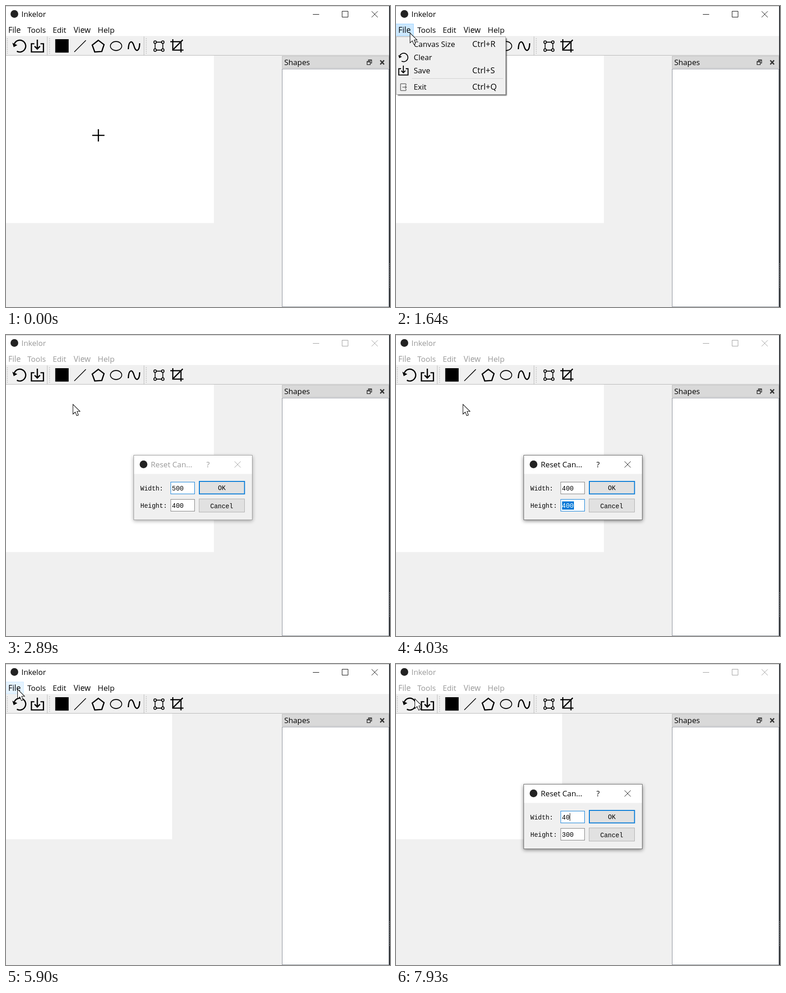
Write an HTML page that moves like this. It is 846 px wide and 662 px high and loops after 8000 ms.

```html
<!DOCTYPE html>
<html lang="en">
<head>
<meta charset="utf-8">
<title>Inkelor</title>
<style>
html, body { margin: 0; width: 100%; height: 100%; overflow: hidden; background: #f0f0f0; }
svg { display: block; width: 846px; height: 662px; font: 16.8px "Open Sans", "Noto Sans", sans-serif; }
text { white-space: pre; }
.mono { font: 14px "Liberation Mono", monospace; }
.line { fill: none; stroke: #000; }
.thick { stroke-width: 2.7; }
#bar, #caption { fill: #000; stroke: #000; }
#bar text, #caption text { stroke: none; }
#bar.off, #caption.off { fill: #999; stroke: #999; }
</style>
</head>
<body>
<svg viewBox="0 0 846 662">
  <defs>
    <filter id="blur" x="-10%" y="-10%" width="120%" height="130%"><feGaussianBlur stdDeviation="4"/></filter>
    <filter id="soft"><feGaussianBlur stdDeviation="1"/></filter>
    <g id="undo" class="line thick">
      <path d="M18.500 83A13 13 0 1 1 24 99.500"/>
      <path d="M14 81 25 86 17 90.500Z" fill="#000" stroke="none"/>
    </g>
    <path id="save" class="line thick" d="M62.500 83H56V101H82.500V83H76M69 74V93M63 88.500 69 94.500 75 88.500"/>
  </defs>

  <rect width="846" height="662" fill="#f0f0f0"/>
  <rect width="844" height="66" fill="#fff"/>
  <rect id="fileBg" x="-.5" y="39.500" width="39" height="26"/>
  <path class="line" d="M0 .5H844" style="stroke:#bdbdbd"/>
  <circle cx="18.500" cy="17.500" r="8.500" fill="#222"/>
  <g id="bar">
    <text x="34" y="24">Inkelor</text>
    <text x="5" y="59" font-size="17.400">File</text>
    <text x="47" y="59">Tools</text>
    <text x="103" y="59">Edit</text>
    <text x="149" y="59" font-size="17.300">View</text>
    <text x="202" y="59" font-size="17.200">Help</text>
    <path fill="none" d="M676 18.500H690M740.500 11.500H753.500V24.500H740.500ZM805.500 11.500 819 25M819 11.500 805.500 25"/>
  </g>

  <path class="line" style="stroke:#b4b4b4" d="M0 108.500H844M91 67V108M304 67V108"/>
  <path class="line" style="stroke:#aaa" stroke-width="1.500" stroke-dasharray="1.500 2.500" d="M3 71V106M96 71V106M309 71V106"/>
  <use href="#undo"/>
  <use href="#save"/>
  <rect x="108.500" y="73" width="29.500" height="29.500"/>
  <g class="line thick">
    <path stroke-width="1.700" d="M150.500 101 176 75.500"/>
    <path d="M203.500 75.500 216 85 211 100 195.500 101 190 86Z"/>
    <ellipse cx="242.500" cy="88" rx="12.500" ry="10" stroke-width="1.800"/>
    <path d="M269.500 95C270 76 278.500 74 282 88S294 101 294.500 82"/>
    <g stroke-width="1.800">
      <path d="M332 79.500H342M332 97H342M328.500 83V94M345.500 83V94"/>
      <circle cx="328.500" cy="79.500" r="2.800"/><circle cx="345.500" cy="79.500" r="2.800"/>
      <circle cx="328.500" cy="97" r="2.800"/><circle cx="345.500" cy="97" r="2.800"/>
    </g>
    <path stroke-width="2.500" d="M362 78.500H385.500V102M367.500 73V97H391M389.500 74.500 368 96"/>
  </g>

  <rect id="canvas" y="109" fill="#fff"/>

  <rect x="608.500" y="110.500" width="235" height="25.500" fill="#d9d9d9" stroke="#bcbcbc"/>
  <text x="613" y="130">Shapes</text>
  <path class="line" stroke-width="1.500" style="stroke:#333" d="M798.500 121V118.500H805.500V125.500H803M795.500 122H802.500V129H795.500ZM795.500 123H802.500M798.500 119.500H805.500"/>
  <path class="line" stroke-width="2.600" style="stroke:#333" d="M824.500 119.500 833 128.500M833 119.500 824.500 128.500"/>
  <rect x="608.500" y="138.500" width="235" height="523" fill="#fff" stroke="#828790"/>
  <rect x="844" width="2" height="662" fill="#25282c"/>
  <path class="line" style="stroke:#999" stroke-dasharray="2 2" d="M845.500 566V620"/>

  <g id="menu">
    <path d="M4 71H244V197H4Z" opacity=".6" filter="url(#soft)"/>
    <rect x=".5" y="67.500" width="241" height="127" fill="#f0f0f0" stroke="#a6a6a6"/>
    <rect id="pick" x="1" y="69" width="236" height="29" fill="#91c9f7"/>
    <text x="39" y="90">Canvas Size</text><text x="168" y="90" font-size="18">Ctrl+R</text>
    <text x="39" y="119">Clear</text>
    <text x="39" y="148">Save</text><text x="168" y="148" font-size="18">Ctrl+S</text>
    <text x="39" y="184">Exit</text><text x="168" y="184" font-size="18">Ctrl+Q</text>
    <use href="#undo" transform="translate(-5 49.600) scale(.72)"/>
    <use href="#save" transform="translate(-37 74) scale(.77)"/>
    <path class="line" style="stroke:#d0d0d0" d="M35 159.500H236"/>
    <path class="line" style="stroke:#666" stroke-width="1.500" d="M22 175V172Q22 171 21 171H11Q10 171 10 172V185Q10 186 11 186H21Q22 186 22 185V182M14 178.500H23M20 175.500 23 178.500 20 181.500"/>
  </g>

  <g id="dialog">
    <rect id="shade" x="281" y="267" width="262" height="142" filter="url(#blur)"/>
    <rect x="281" y="264" width="262" height="143" fill="#f0f0f0"/>
    <rect x="281" y="264" width="262" height="41.500" fill="#fff"/>
    <rect id="frame" x="281.500" y="264.500" width="261" height="142" fill="none"/>
    <circle cx="303" cy="284.500" r="8.500" fill="#222"/>
    <g id="caption">
      <text x="319" y="290.500">Reset Can...</text>
      <text x="441.500" y="290.500">?</text>
      <path fill="none" d="M503.500 278 517 291.500M517 278 503.500 291.500"/>
    </g>
    <g class="mono">
      <text x="296" y="342">Width:</text>
      <text x="296" y="380">Height:</text>
      <rect id="wBox" x="363" y="323.500" width="52.500" height="26" fill="#fff"/>
      <rect id="hBox" x="363" y="361.500" width="52.500" height="26" fill="#fff"/>
      <rect id="sel" x="366" y="366" width="26" height="18" fill="#0078d7"/>
      <text id="wText" x="365.500" y="342" font-size="14.400"></text>
      <text id="hText" x="365.500" y="380" font-size="14.400"></text>
      <rect id="caret" width="1" height="17"/>
      <rect x="426" y="322" width="99.500" height="27.500" fill="#e1e1e1" stroke="#0078d7" stroke-width="2"/>
      <rect x="425.500" y="360.500" width="100" height="29" fill="#e1e1e1" stroke="#adadad"/>
      <text id="ok" x="467" y="341">OK</text>
      <text x="450" y="380.500">Cancel</text>
    </g>
  </g>

  <path id="arrow" d="M.5.500V22L5.500 17.500 9 25.500 12.500 24 9.500 16H16Z" fill="#fff" stroke="#000" stroke-width="1.100"/>
  <path id="cross" class="line" stroke-width="2.600" d="M-13.500 0H13.500M0-13.500V13.500"/>
</svg>
<script>
const LOOP = 8000;
const $ = id => document.getElementById(id);
const set = (id, attrs) => {
  for (const k in attrs) $(id).setAttribute(k, attrs[k]);
};
const show = (id, on) => set(id, { visibility: on ? 'visible' : 'hidden' });

// Each row: time, value held from then on.
const menuFade = [[0, 0], [1260, .4], [1340, .8], [1410, 1], [1950, 0],
  [6200, .4], [6280, .8], [6350, 1], [7260, 0]];
const dialogFade = [[0, 0], [2030, .25], [2100, .62], [2180, .85], [2270, .95], [2350, 1],
  [4700, .5], [4790, .18], [4880, 0], [7340, .15], [7410, .45], [7480, .8], [7560, 1]];
const modal = [[0, false], [2030, true], [4700, false], [7340, true]];
const dialogActive = [[0, false], [2180, true], [2890, false], [2970, true], [3040, false],
  [3120, true], [4700, false], [7480, true]];
const widthText = [[0, '500'], [3120, '50'], [3270, '5'], [3500, ''], [3650, '4'],
  [3740, '40'], [3890, '400'], [7930, '40']];
const heightText = [[0, '400'], [4290, '3'], [4380, '30'], [4540, '300']];
const focusHeight = [[0, false], [4030, true], [4880, false]];
const caretOn = [[0, true], [2890, false], [2970, true], [4030, false], [4290, true],
  [7790, false], [7930, true]];

// Pointer moves: start, step length, step count, destination.
const moves = [[290, 80, 10, 27, 55], [1640, 80, 4, 49, 80], [2500, 78, 5, 147, 152],
  [5400, 83, 7, 25, 55], [6520, 80, 3, 41, 76]];

const at = (rows, t) => rows.reduce((v, row) => t >= row[0] ? row[1] : v, rows[0][1]);
const ease = p => p * p * (3 - 2 * p);

function pointer(t) {
  let x = 203, y = 284;
  for (const [start, step, count, tx, ty] of moves) {
    if (t < start) break;
    const p = ease(Math.min(1, (Math.floor((t - start) / step) + 1) / count));
    x += (tx - x) * p;
    y += (ty - y) * p;
  }
  return [x, y];
}

function drawDialog(t) {
  const alpha = at(dialogFade, t);
  show('dialog', alpha > 0);
  if (!alpha) return;
  const scale = .965 + .035 * alpha;
  const active = at(dialogActive, t);
  const onHeight = at(focusHeight, t);
  const w = at(widthText, t), h = at(heightText, t);
  set('dialog', { opacity: alpha, transform: `translate(410 335.5) scale(${scale}) translate(-410 -335.5)` });
  set('frame', { stroke: active ? '#666' : '#999' });
  set('shade', { opacity: active ? .5 : .35 });
  $('caption').classList.toggle('off', !active);
  set('wBox', { stroke: onHeight ? '#7a7a7a' : '#0078d7' });
  set('hBox', { stroke: onHeight ? '#0078d7' : '#7a7a7a' });
  $('wText').textContent = w;
  $('hText').textContent = h;
  const selected = onHeight && t < 4290;
  set('sel', { opacity: selected ? 1 : 0 });
  set('hText', { fill: selected ? '#fff' : '#000' });
  set('ok', { fill: w ? '#000' : '#a0a0a0' });
  set('caret', {
    x: 365.5 + (onHeight ? h : w).length * 8.6,
    y: onHeight ? 366 : 328,
    opacity: at(caretOn, t) ? 1 : 0
  });
}

function draw(t) {
  const [x, y] = pointer(t);
  const menu = at(menuFade, t), blocked = at(modal, t);
  const small = t >= 4700;
  set('canvas', { width: small ? 366 : 458, height: small ? 276.4 : 368.4 });
  $('bar').classList.toggle('off', blocked);

  const hover = x < 39 && y < 66 && !blocked;
  const [fill, stroke] = menu ? ['#cce8ff', '#99d1ff'] : hover ? ['#e5f3ff', '#cce8ff'] : ['#fff', '#fff'];
  set('fileBg', { fill, stroke });
  set('menu', { opacity: menu });
  show('pick', menu > 0 && y > 69);
  drawDialog(t);

  const drawing = y > 109 && !blocked;
  show('arrow', !drawing);
  show('cross', drawing);
  set('arrow', { transform: `translate(${x} ${y})` });
  set('cross', { transform: `translate(${x + .5} ${y + .5})` });
}

const begin = performance.now();
function tick() {
  draw((performance.now() - begin) % LOOP);
  requestAnimationFrame(tick);
}
tick();
</script>
</body>
</html>
```
